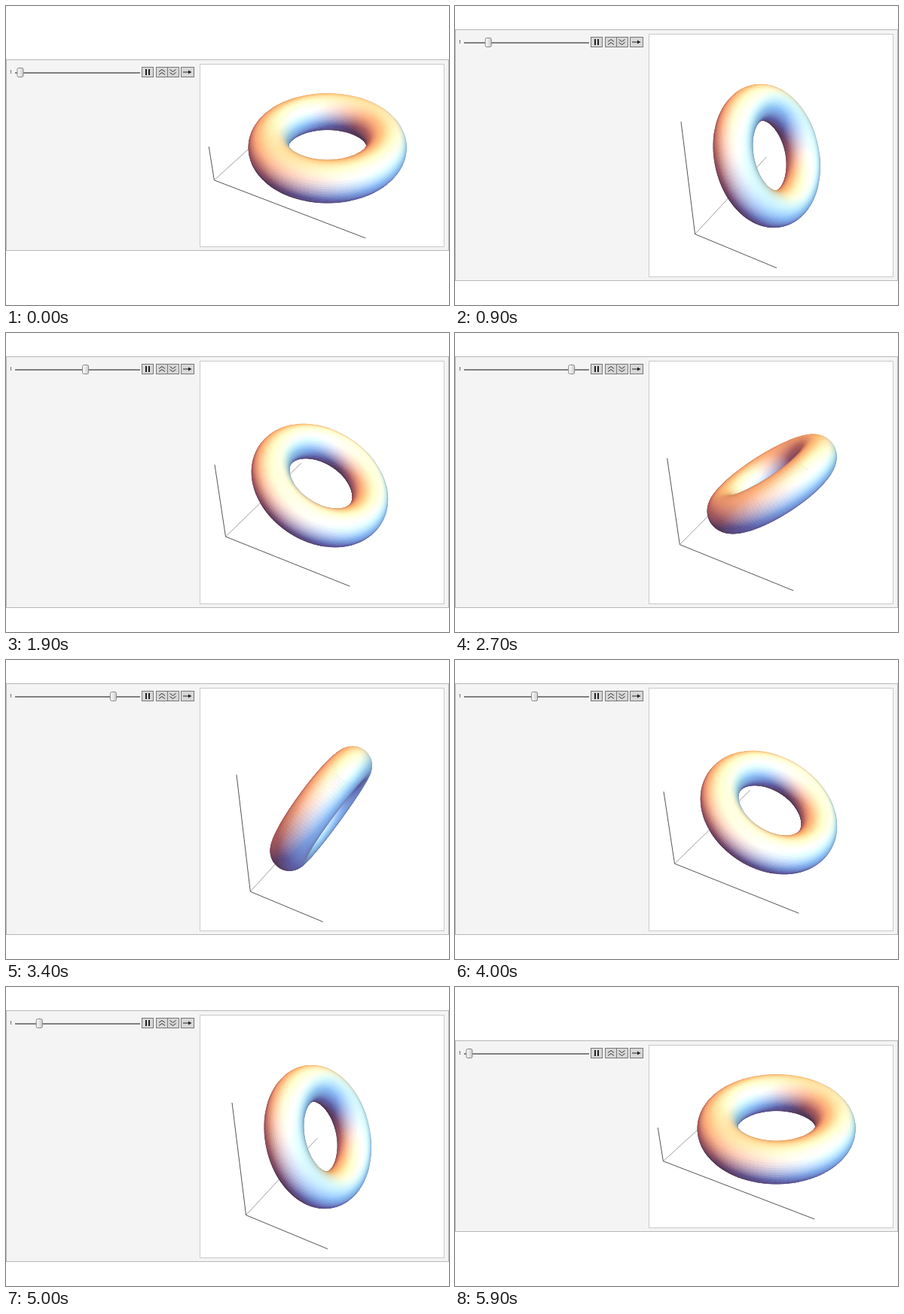
Recreate the animation shown at these times as an HTML page with a canvas. Size 588 px wide and 398 px high, loop 6 s.

```html
<!DOCTYPE html>
<html lang="en">
<head>
<meta charset="utf-8">
<title>Rotating torus</title>
<style>
  html, body { margin: 0; width: 100%; height: 100%; overflow: hidden; background: #fff; }
  canvas { display: block; }
</style>
</head>
<body>
<canvas id="stage" width="588" height="398"></canvas>
<script>
const ctx = document.getElementById('stage').getContext('2d');
const STEP_MS = 100, STEPS = 60;
const RING = 3 / 8, TUBE = 1 / 8;          // torus radii, outer diameter is 1
const PADDING = 1.04;                      // bounding box relative to the torus
const CENTER = { x: 419.3, y: 198.5 };
const SEG_U = 128, SEG_V = 56;

const dot = (a, b) => a[0] * b[0] + a[1] * b[1] + a[2] * b[2];
const unit = a => a.map(c => c / Math.hypot(...a));
const cross = (a, b) => [
  a[1] * b[2] - a[2] * b[1], a[2] * b[0] - a[0] * b[2], a[0] * b[1] - a[1] * b[0]];

// Camera
const EYE = [1.3, -2.4, 2];
const DIST = Math.hypot(...EYE);
const FORWARD = unit(EYE.map(c => -c));
const RIGHT = unit(cross(FORWARD, [0, 0, 1]));
const UP = cross(RIGHT, FORWARD);

// Lights in screen space: right, up, towards the viewer
const AMBIENT = [0.33, 0.21, 0.27];
const LIGHTS = [
  { dir: unit([-0.5, 1.5, 1.5]), color: [0.56, 0.24, 0.04] },
  { dir: unit([1.5, 1.5, 2.5]), color: [0.28, 0.49, 0.24] },
  { dir: unit([1.5, -0.5, 1.5]), color: [0.04, 0.24, 0.50] },
  { dir: unit([-0.5, -0.5, 1.5]), color: [0, 0, 0.10] }
];

function project(p) {
  const depth = DIST + dot(FORWARD, p);
  return { x: dot(RIGHT, p) / depth, y: dot(UP, p) / depth, depth };
}

function shade(normal) {
  const n = [dot(RIGHT, normal), dot(UP, normal), -dot(FORWARD, normal)];
  const rgb = AMBIENT.slice();
  for (const { dir, color } of LIGHTS) {
    const k = Math.max(0, dot(n, dir));
    color.forEach((c, i) => rgb[i] += c * k);
  }
  return `rgb(${rgb.map(c => Math.round(255 * Math.min(1, c))).join()})`;
}

function box(x, y, w, h, fill, stroke) {
  ctx.fillStyle = fill;
  ctx.fillRect(x, y, w, h);
  ctx.strokeStyle = stroke;
  ctx.lineWidth = 1;
  ctx.strokeRect(x + 0.5, y + 0.5, w - 1, h - 1);
}

function line(points, color, width) {
  ctx.beginPath();
  for (const [x, y] of points) ctx.lineTo(x, y);
  ctx.strokeStyle = color;
  ctx.lineWidth = width;
  ctx.stroke();
}

// Picture height snaps to one of three sizes
function plotHeight(degrees) {
  const d = degrees % 180;
  if (Math.min(d, 180 - d) < 4) return 243;
  return Math.abs(d - 90) < 3 ? 383 : 323;
}

function makeView(half, height) {
  if (height === 323) return p => {
    const q = project(p);
    return { x: CENTER.x + 671 * q.x, y: CENTER.y - 671 * q.y };
  };
  const corners = [];
  for (const i of [-1, 1]) for (const j of [-1, 1]) for (const k of [-1, 1])
    corners.push(project([i * half[0], j * half[1], k * half[2]]));
  const xs = corners.map(c => c.x), ys = corners.map(c => c.y);
  const x0 = Math.min(...xs), x1 = Math.max(...xs);
  const y0 = Math.min(...ys), y1 = Math.max(...ys);
  const scale = 0.926 * Math.min(324 / (x1 - x0), height / (y1 - y0));
  return p => {
    const q = project(p);
    return {
      x: CENTER.x + scale * (q.x - (x0 + x1) / 2),
      y: CENTER.y - scale * (q.y - (y0 + y1) / 2)
    };
  };
}

function drawAxes(half, view) {
  const [a, b, c] = half;
  const at = (x, y, z) => { const q = view([x, y, z]); return [q.x, q.y]; };
  const origin = at(-a, -b, -c);
  line([origin, at(-a, b, -c)], '#888', 0.8);
  line([at(-a, -b, c), origin, at(a, -b, -c)], '#555', 1);
}

function drawTorus(angle, view) {
  const cos = Math.cos(angle), sin = Math.sin(angle);
  const tilt = ([x, y, z]) => [x * cos + z * sin, y, z * cos - x * sin];
  const normalAt = (u, v) => tilt([
    Math.cos(v) * Math.cos(u), Math.cos(v) * Math.sin(u), Math.sin(v)]);
  const pointAt = (u, v) => {
    const r = RING + TUBE * Math.cos(v);
    return tilt([r * Math.cos(u), r * Math.sin(u), TUBE * Math.sin(v)])
      .map(c => c / PADDING);
  };
  const du = 2 * Math.PI / SEG_U, dv = 2 * Math.PI / SEG_V;
  const grid = [];
  for (let i = 0; i <= SEG_U; i++) {
    grid.push([]);
    for (let j = 0; j <= SEG_V; j++) grid[i].push(view(pointAt(i * du, j * dv)));
  }
  const faces = [];
  for (let i = 0; i < SEG_U; i++) for (let j = 0; j < SEG_V; j++) {
    const u = (i + 0.5) * du, v = (j + 0.5) * dv;
    const n = normalAt(u, v), p = pointAt(u, v);
    if (dot(n, EYE.map((c, k) => c - p[k])) < -0.1) continue;
    const quad = [grid[i][j], grid[i + 1][j], grid[i + 1][j + 1], grid[i][j + 1]];
    faces.push({ quad, color: shade(n), depth: DIST + dot(FORWARD, p) });
  }
  faces.sort((f, g) => g.depth - f.depth);
  ctx.lineWidth = 0.6;
  for (const { quad, color } of faces) {
    ctx.beginPath();
    for (const q of quad) ctx.lineTo(q.x, q.y);
    ctx.closePath();
    ctx.fillStyle = ctx.strokeStyle = color;
    ctx.fill();
    ctx.stroke();
  }
}

function drawControls(top, thumbX) {
  const y = top + 17;
  ctx.fillStyle = '#444';
  ctx.font = '7px "Liberation Sans", Arial, sans-serif';
  ctx.fillText('t', 5.5, y + 2);

  ctx.fillStyle = '#808080';
  ctx.fillRect(12, y, 166, 2);

  const shine = ctx.createLinearGradient(thumbX - 4, 0, thumbX + 4, 0);
  shine.addColorStop(0, '#fff');
  shine.addColorStop(1, '#ccc');
  ctx.beginPath();
  ctx.roundRect(thumbX - 4, y - 5.5, 8, 12, 2);
  ctx.fillStyle = shine;
  ctx.fill();
  ctx.strokeStyle = '#888';
  ctx.lineWidth = 1;
  ctx.stroke();

  for (const [x, w] of [[180, 16], [199, 16], [214, 16], [232, 18]])
    box(x, y - 7, w, 14, '#d8d8d8', '#777');
  ctx.fillStyle = '#222';
  ctx.fillRect(185, y - 4, 2, 8);
  ctx.fillRect(189, y - 4, 2, 8);
  const chevron = (x, cy, d) =>
    line([[x - 4, cy + d], [x, cy - d], [x + 4, cy + d]], '#333', 1);
  for (const dy of [-2, 2]) {
    chevron(207, y + dy, 1.5);
    chevron(221.5, y + dy, -1.5);
  }
  line([[235, y], [244, y]], '#222', 1);
  ctx.beginPath();
  ctx.moveTo(246.5, y);
  ctx.lineTo(242, y - 2.5);
  ctx.lineTo(242, y + 2.5);
  ctx.fill();
}

function draw(step) {
  const pos = Math.min(step, STEPS - 1 - step);
  const degrees = Math.max(0, 360 - 14.63 * (29.5 - pos));
  const angle = degrees * Math.PI / 180;
  const height = plotHeight(degrees);
  const top = Math.round(192.5 - height / 2);
  const half = [
    RING * Math.abs(Math.cos(angle)) + TUBE, 0.5,
    RING * Math.abs(Math.sin(angle)) + TUBE];

  ctx.fillStyle = '#fff';
  ctx.fillRect(0, 0, 588, 398);
  box(0, top, 588, height + 12, '#f4f4f4', '#b8b8b8');
  box(257, top + 6, 325, height + 1, '#fff', '#cacaca');
  drawControls(top, 19 + 151 * degrees / 360);

  const view = makeView(half, height);
  drawAxes(half, view);
  drawTorus(angle, view);
}

let shown = -1;
function tick() {
  const step = Math.floor(performance.now() / STEP_MS) % STEPS;
  if (step !== shown) draw(shown = step);
  requestAnimationFrame(tick);
}
tick();
</script>
</body>
</html>
```
